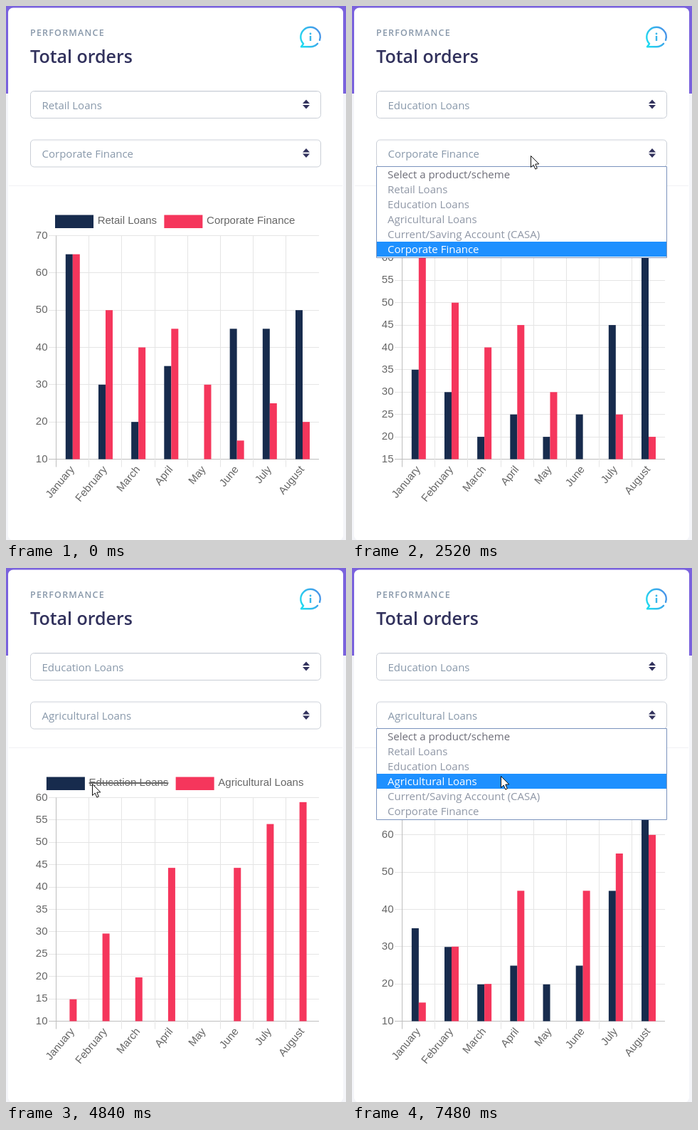
Recreate the animation shown at these times as an HTML page with a canvas. Size 478 px wide and 750 px high, loop 7520 ms.

```html
<!DOCTYPE html>
<html lang="en">
<head>
<meta charset="utf-8">
<title>Total orders</title>
<style>
html, body { margin: 0; width: 100%; height: 100%; overflow: hidden; background: #f4f5f9; }
canvas { display: block; }
</style>
</head>
<body>
<canvas id="stage" width="478" height="750"></canvas>
<script>
const LOOP = 7520, STEP = 40, ANIM = 1000;
const SANS = '"Open Sans", sans-serif', ARIAL = '"Liberation Sans", Arial, sans-serif';
const NAVY = '#172b4d', RED = '#f5365c';
const ctx = document.getElementById('stage').getContext('2d');

const months = ['January', 'February', 'March', 'April', 'May', 'June', 'July', 'August'];
const data = {
  'Retail Loans': [65, 30, 20, 35, 10, 45, 45, 50],
  'Corporate Finance': [65, 50, 40, 45, 30, 15, 25, 20],
  'Education Loans': [35, 30, 20, 25, 20, 25, 45, 65],
  'Agricultural Loans': [15, 30, 20, 45, 10, 45, 55, 60]
};
const [RETAIL, CORPORATE, EDUCATION, AGRI] = Object.keys(data);
const options = ['Select a product/scheme', RETAIL, EDUCATION, AGRI, 'Current/Saving Account (CASA)', CORPORATE];

// Chart states: start, the two series, axis range and step, hidden series
const states = [
  { at: -ANIM, names: [RETAIL, CORPORATE], min: 10, max: 70, step: 10 },
  { at: 1663, names: [EDUCATION, CORPORATE], min: 15, max: 65, step: 5 },
  { at: 3463, names: [EDUCATION, AGRI], min: 10, max: 70, step: 10 },
  { at: 4430, names: [EDUCATION, AGRI], min: 10, max: 60, step: 5, hidden: 0 },
  { at: 5080, names: [EDUCATION, AGRI], min: 10, max: 70, step: 10 },
  { at: 6240, names: [EDUCATION, AGRI], min: 20, max: 65, step: 5, hidden: 1 },
  { at: 6811, names: [EDUCATION, AGRI], min: 10, max: 70, step: 10 }
];
// Menu: time, select index, highlighted row (none when closed)
const menu = [[0], [840, 0, 1], [1400, 0, 2], [1640], [2240, 1, 5], [2960, 1, 2], [3080, 1, 3], [3440], [7040, 1, 3]];
// Pointer: time, x, y
const path = [
  [480, 310, 260], [800, 262, 142], [1240, 262, 142], [1560, 261, 207], [1680, 260, 231],
  [2080, 252, 210], [2680, 250, 210], [3240, 119, 318], [3400, 121, 303], [5400, 121, 303],
  [5760, 274, 303], [6760, 274, 303], [6880, 247, 213], [7080, 247, 213], [7440, 209, 292]
];

const LEFT = 70.5, RIGHT = 440, TOP = 322.5, BASE = 636.5, SLOT = 46.17;
const mix = (a, b, p) => a + (b - a) * p;
const easeOut = p => 1 - (1 - Math.min(1, p)) ** 4;
const current = (list, t, key) => list.filter(e => e[key] <= t).pop();

function text(str, x, y, font, color, align = 'left', baseline = 'alphabetic') {
  ctx.font = font;
  ctx.fillStyle = color;
  ctx.textAlign = align;
  ctx.textBaseline = baseline;
  ctx.fillText(str, x, y);
}

function box(x, y, w, h, r, fill, stroke) {
  ctx.beginPath();
  ctx.roundRect(x, y, w, h, r);
  if (fill) { ctx.fillStyle = fill; ctx.fill(); }
  if (stroke) { ctx.strokeStyle = stroke; ctx.lineWidth = 1; ctx.stroke(); }
}

function line(x1, y1, x2, y2, color, width = 1) {
  ctx.beginPath();
  ctx.moveTo(x1, y1);
  ctx.lineTo(x2, y2);
  ctx.strokeStyle = color;
  ctx.lineWidth = width;
  ctx.stroke();
}

function shape(points, fill) {
  ctx.beginPath();
  points.forEach(([x, y]) => ctx.lineTo(x, y));
  ctx.closePath();
  ctx.fillStyle = fill;
  ctx.fill();
}

function infoIcon() {
  const g = ctx.createLinearGradient(413, 50, 443, 38);
  g.addColorStop(0, '#1fdcf0');
  g.addColorStop(1, '#4a90e8');
  ctx.beginPath();
  ctx.arc(428, 43.5, 13.7, 0.75, 1.57);
  ctx.lineTo(415, 57.2);
  ctx.lineTo(418, 53.2);
  ctx.arc(428, 43.5, 13.7, 2.38, 6.6);
  ctx.strokeStyle = g;
  ctx.lineWidth = 2.4;
  ctx.lineJoin = ctx.lineCap = 'round';
  ctx.stroke();
  ctx.lineCap = 'butt';
  line(428, 42, 428, 49, '#38b6ea', 2.4);
  box(426.6, 37.6, 2.8, 2.8, 1.4, '#38b6ea');
}

function page() {
  ctx.fillStyle = '#f4f5f9';
  ctx.fillRect(0, 0, 478, 750);
  ctx.fillStyle = '#7a62dd';
  ctx.fillRect(0, 0, 478, 123);
  box(3, 2.5, 471, 748, 7, '#fff');
  line(4, 252.5, 473, 252.5, '#f0f1f4');
  ctx.letterSpacing = '1.2px';
  text('PERFORMANCE', 34, 42, '600 12.5px ' + SANS, '#8898aa');
  ctx.letterSpacing = '0px';
  text('Total orders', 34, 80, '600 25px ' + SANS, '#32325d');
  infoIcon();
}

function select(y, label) {
  box(34.5, y + 0.5, 408, 38, 5, '#fff', '#c9ced6');
  line(38, y + 1.5, 439, y + 1.5, '#eef0f3');
  text(label, 50.5, y + 25.5, '15px ' + SANS, '#8898aa');
  shape([[417, y + 18], [422, y + 12.5], [427, y + 18]], '#32325d');
  shape([[417, y + 20], [427, y + 20], [422, y + 25.5]], '#32325d');
}

function dropdown(y, row) {
  box(34.5, y + 0.5, 408, 128, 0, '#fff', '#7b93bd');
  ctx.fillStyle = '#1e90ff';
  ctx.fillRect(35, y + 1 + row * 21 - 0, 407, 21);
  options.forEach((o, i) =>
    text(o, 50, y + 17 + i * 21, '15px ' + SANS, i === row ? '#fff' : i ? '#8f97a6' : '#6d6d78'));
}

// Each series keeps its sideways offset and bar heights; hidden ones stay frozen
function barsAt(t) {
  let view;
  states.forEach((s, k) => {
    if (s.at > t) return;
    const end = Math.min(t, k + 1 < states.length ? states[k + 1].at : LOOP);
    const p = easeOut((end - s.at) / ANIM);
    view = s.names.map((name, j) => {
      if (s.hidden === j) return view[j];
      const goal = [s.hidden === undefined ? j * 10 - 10 : -5,
        ...data[name].map(v => (v - s.min) / (s.max - s.min) * (BASE - TOP))];
      return view ? goal.map((g, i) => mix(view[j][i], g, p)) : goal;
    });
  });
  return view;
}

function legend(s) {
  const font = '15px ' + ARIAL;
  ctx.font = font;
  const widths = s.names.map(n => ctx.measureText(n).width);
  let x = 237.8 - (widths[0] + widths[1] + 130) / 2;
  s.names.forEach((name, j) => {
    ctx.fillStyle = j ? RED : NAVY;
    ctx.fillRect(x, 293.5, 54, 18.5);
    text(name, x + 59.7, 302, font, '#666', 'left', 'middle');
    if (s.hidden === j) line(x + 59.7, 302, x + 59.7 + widths[j], 302, '#666', 2);
    x += widths[j] + 70;
  });
}

function chart(t) {
  const s = current(states, t, 'at');
  legend(s);
  for (let v = s.min; v <= s.max; v += s.step) {
    const y = mix(BASE, TOP, (v - s.min) / (s.max - s.min));
    const py = Math.floor(y) + 0.5;
    line(60, py, RIGHT, py, v === s.min ? '#bfbfbf' : '#e5e5e5');
    text(v, 58.5, y, '15px ' + ARIAL, '#666', 'right', 'middle');
  }
  months.forEach((m, i) => {
    const x = Math.floor(LEFT + i * SLOT) + 0.5;
    line(x, TOP, x, BASE + 11, i ? '#e5e5e5' : '#bfbfbf');
    ctx.save();
    ctx.translate(LEFT + (i + 0.5) * SLOT, 648.5);
    ctx.rotate(-50 * Math.PI / 180);
    text(m, 0, 0, '15px ' + ARIAL, '#666', 'right', 'middle');
    ctx.restore();
  });
  barsAt(t).forEach(([dx, ...heights], j) => {
    if (s.hidden === j) return;
    ctx.fillStyle = j ? RED : NAVY;
    heights.forEach((h, i) => ctx.fillRect(93.8 + i * SLOT + dx, BASE - h, 10, h));
  });
}

function pointer(t) {
  if (t < path[0][0]) return;
  const k = path.filter(p => p[0] <= t).length;
  const a = path[k - 1], b = path[k] || a;
  const p = b === a ? 0 : (t - a[0]) / (b[0] - a[0]);
  ctx.save();
  ctx.translate(Math.round(mix(a[1], b[1], p)) + 0.5, Math.round(mix(a[2], b[2], p)) + 0.5);
  shape([[0, 0], [0, 16], [3.7, 12.6], [6.3, 18.6], [8.8, 17.5], [6.3, 11.6], [11.3, 11.4]], '#fff');
  ctx.strokeStyle = '#111';
  ctx.lineWidth = 1;
  ctx.stroke();
  ctx.restore();
}

function draw(now) {
  const t = Math.floor(now % LOOP / STEP) * STEP;
  const [, which, row] = current(menu, t, 0);
  page();
  select(119, t < 1640 ? RETAIL : EDUCATION);
  select(187.5, t < 3440 ? CORPORATE : AGRI);
  chart(t);
  if (row !== undefined) dropdown(which ? 225 : 157, row);
  pointer(t);
  requestAnimationFrame(draw);
}
requestAnimationFrame(draw);
</script>
</body>
</html>
```
